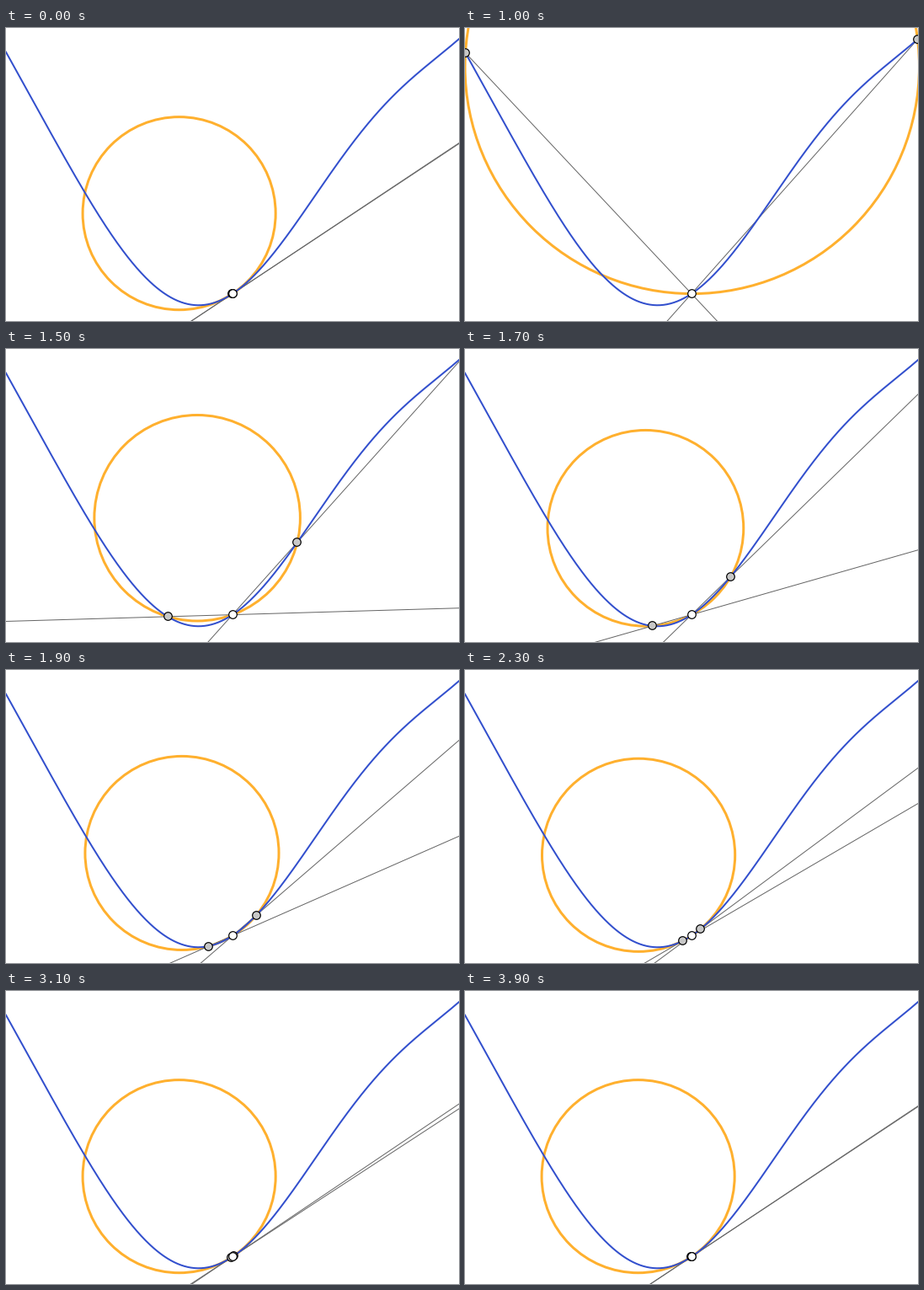
Animation, 538 px wide and 348 px high, one loop 4 s. Source, as a matplotlib script:

```python
import numpy as np
import matplotlib.pyplot as plt
from matplotlib.animation import FuncAnimation
from matplotlib.patches import Circle

W, H = 538, 348
DPI = 100
PX = 72 / DPI            # one pixel in points
STEPS, HOLD = 30, 10     # moving frames, frames resting on the last pose
CX, CY = 269.0, 315.6    # fixed point on the curve
REACH = 268.5            # first distance of the outer points


def curve(x):
    """Screen height of the blue curve at x."""
    h = x - CX
    even = 0.003364 * h**2 + 34.4 * (1 - np.cos(0.0156 * h))
    odd = 0.0831 * h + 45.03 * np.sin(0.0129 * h)
    return CY - even - odd


def circle_through(a, b, c):
    """Centre and radius of the circle through three points."""
    u, v = b - a, c - a
    d = 2 * (u[0] * v[1] - u[1] * v[0])
    uu, vv = u @ u, v @ v
    off = np.array([v[1] * uu - u[1] * vv, u[0] * vv - v[0] * uu]) / d
    return a + off, np.hypot(*off)


def on_pixel(p):
    return np.floor(p) + 0.5


fig = plt.figure(figsize=(W / DPI, H / DPI), dpi=DPI, facecolor="white")
ax = fig.add_axes([0, 0, 1, 1])
ax.set_xlim(0, W)
ax.set_ylim(H, 0)
ax.axis("off")

ring = ax.add_patch(Circle((0, 0), 1, fill=False, ec="#ffb02e", lw=3 * PX, zorder=1))
secants = [ax.plot([], [], color="#666666", lw=PX, zorder=2)[0] for _ in range(2)]
xs = np.linspace(0, W, 400)
ax.plot(xs, curve(xs), color="#324fcd", lw=2 * PX, zorder=3)


def dot(fill, z):
    patch = Circle((0, 0), 4.8, fc=fill, ec="black", lw=1.2 * PX, zorder=z)
    patch.set_snap(False)
    return ax.add_patch(patch)


outer = [dot("#c8c8c8", 4), dot("#c8c8c8", 4)]
middle = np.array([CX, CY])
dot("white", 5).center = on_pixel(middle)


def update(frame):
    step = (frame - HOLD) if frame >= HOLD else STEPS - 1
    gap = REACH * np.exp(-step / 4)
    ends = [np.array([x, curve(x)]) for x in (CX - gap, CX + gap)]

    ring.center, ring.radius = circle_through(middle, *ends)
    for p, line, mark in zip(ends, secants, outer):
        slope = (p[1] - CY) / (p[0] - CX)
        x = np.array([-10, W + 10])
        line.set_data(x, CY + slope * (x - CX))
        mark.center = on_pixel(p)
    return [ring, *secants, *outer]


anim = FuncAnimation(fig, update, frames=STEPS + HOLD, interval=100,
                     repeat=True, repeat_delay=0, blit=False)
plt.show()
```
